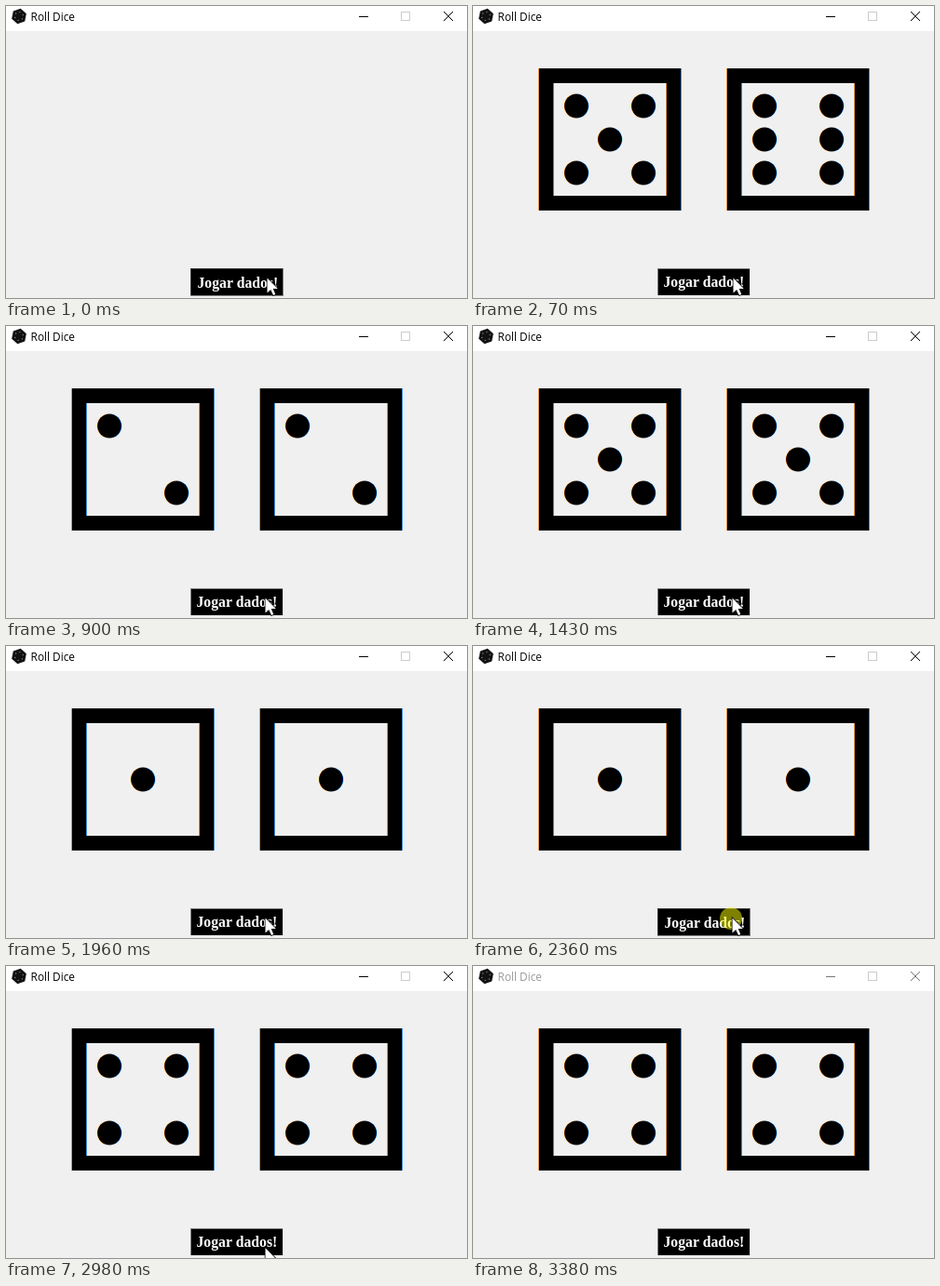
An HTML page with a canvas that plays this animation: 495 px wide and 314 px high, repeating every 3450 ms.

```html
<!DOCTYPE html>
<html lang="pt">
<head>
<meta charset="utf-8">
<style>
html, body { margin: 0; width: 100%; height: 100%; overflow: hidden; background: #f0f0f0; }
canvas { display: block; }
</style>
</head>
<body>
<canvas id="stage" width="495" height="314"></canvas>
<script>
const ctx = document.getElementById('stage').getContext('2d');
const LOOP = 3450;
const TICK = 70;      // the pointer moves in steps of this many ms
const BLUR = 3380;    // the window loses focus

// Button down, button up, and the faces rolled on release.
const clicks = [
  [0, 70, '56'],
  [270, 400, '44'],
  [770, 900, '22'],
  [1300, 1430, '55'],
  [1830, 1960, '11'],
  [2360, 2490, '46'],
  [2760, 2840, '44']
];
const LEAVE = clicks.at(-1)[1];

function rect(color, x, y, w, h) {
  ctx.fillStyle = color;
  ctx.fillRect(x, y, w, h);
}

function disc(color, x, y, r) {
  ctx.fillStyle = color;
  ctx.beginPath();
  ctx.arc(x, y, r, 0, 2 * Math.PI);
  ctx.fill();
}

function trace(points) {
  ctx.beginPath();
  points.forEach(([x, y]) => ctx.lineTo(x, y));
  ctx.closePath();
}

function text(color, font, string, x, y) {
  ctx.fillStyle = color;
  ctx.font = font;
  ctx.fillText(string, x, y);
}

function drawIcon(x, y) {
  const corner = (r, i) => [x + r * Math.sin(i * Math.PI / 3 + 0.2), y - r * Math.cos(i * Math.PI / 3 + 0.2)];
  const corners = r => Array.from({ length: 6 }, (_, i) => corner(r, i));
  ctx.fillStyle = '#111';
  trace(corners(8.3));
  ctx.fill();
  corners(4.5).forEach(([cx, cy]) => disc('#888', cx, cy, 0.7));
}

function drawTitleBar(active) {
  const ink = active ? '#000' : '#777';
  rect('#fff', 0, 0, 495, 27);
  drawIcon(14, 11);
  text(active ? '#000' : '#999', '11.8px "Open Sans", sans-serif', 'Roll Dice', 26.6, 16);
  rect(ink, 379, 11, 10, 1);
  ctx.lineWidth = 1;
  ctx.strokeStyle = '#ccc';
  ctx.strokeRect(424.5, 6.5, 9, 9);
  ctx.strokeStyle = ink;
  ctx.beginPath();
  ctx.moveTo(470, 6);
  ctx.lineTo(480, 16);
  ctx.moveTo(480, 6);
  ctx.lineTo(470, 16);
  ctx.stroke();
}

// Draws black ink with each colour channel a third of a pixel apart, as in subpixel text.
function subpixel(paint) {
  ctx.save();
  ctx.globalCompositeOperation = 'multiply';
  ctx.translate(1 / 3, 0);
  for (const color of ['#0ff', '#f0f', '#ff0']) {
    paint(color);
    ctx.translate(-1 / 3, 0);
  }
  ctx.restore();
}

function drawDie(x, y, value) {
  const pip = (col, row) => subpixel(color => disc(color, x + 36 * col, y + 36 * row, 13));
  subpixel(color => {
    ctx.strokeStyle = color;
    ctx.lineWidth = 15.8;
    ctx.strokeRect(x - 68.5, y - 68.5, 137, 137);
  });
  if (value % 2) pip(0, 0);
  for (const side of [-1, 1]) {
    if (value > 1) pip(side, side);
    if (value > 3) pip(side, -side);
    if (value === 6) pip(side, 0);
  }
}

function drawButton(pressed) {
  rect(pressed ? '#7f7f7f' : '#e3e3e3', 198, 282, 100, 30);
  rect(pressed ? '#3f3f3f' : '#7f7f7f', 198, 282, 99, 29);
  rect('#000', 199, 283, 98, 28);
  text('#fff', 'bold 15.7px "Liberation Serif", serif', 'Jogar dados!', 204.5 + pressed, 302 + pressed);
}

function drawPointer(x, y) {
  ctx.save();
  ctx.translate(x, y);
  trace([[0.5, 0.5], [0.5, 16.5], [4.2, 13], [7, 19], [9.3, 18], [6.7, 12], [11.8, 12]]);
  ctx.strokeStyle = '#000';
  ctx.lineWidth = 1.5;
  ctx.stroke();
  ctx.fillStyle = '#fff';
  ctx.fill();
  ctx.restore();
}

function draw() {
  const t = performance.now() % LOOP;
  const pressed = clicks.some(([down, up]) => t >= down && t < up);
  const roll = clicks.findLast(([, up]) => t >= up);
  const exit = Math.max(0, Math.floor((t - LEAVE) / TICK));
  const x = 280 - Math.min(2, Math.floor(t / TICK));
  const y = 292 + 2.7 * exit ** 2;

  rect('#f0f0f0', 0, 0, 495, 314);
  drawTitleBar(t < BLUR);
  if (roll) [...roll[2]].forEach((face, i) => drawDie(147 + 202 * i, 143.5, Number(face)));
  drawButton(pressed);
  if (pressed && roll) disc('rgba(255, 255, 0, 0.5)', x - 1, y + 1, 12);
  drawPointer(x, y);
  requestAnimationFrame(draw);
}

draw();
</script>
</body>
</html>
```
